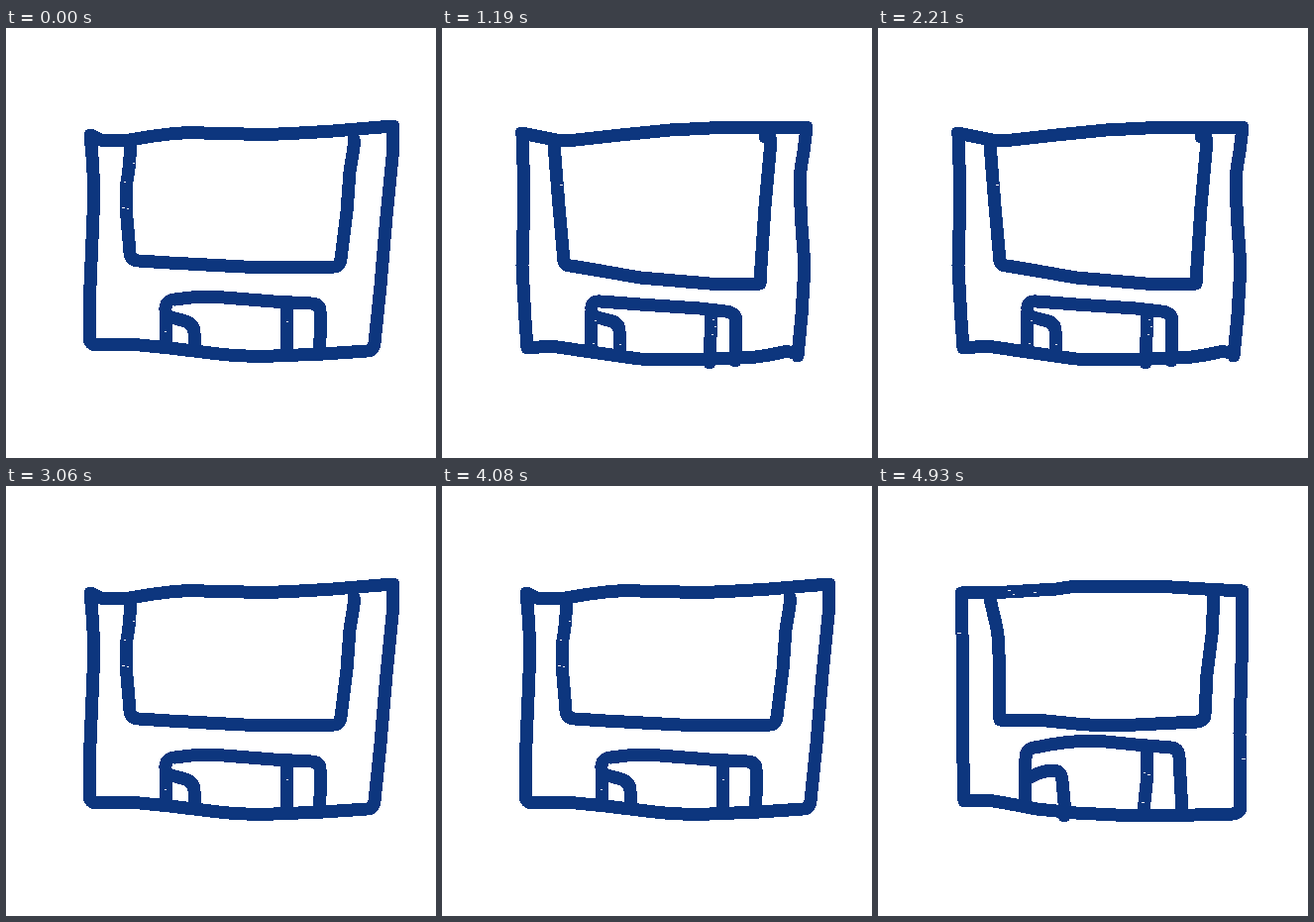
Recreate the animation shown at these times as an HTML page. Size 434 px wide and 434 px high, loop 5.1 s.

```html
<!DOCTYPE html>
<html lang="en">
<head>
<meta charset="utf-8">
<title>Wobbling sketch</title>
<style>
  html, body { margin: 0; width: 100%; height: 100%; overflow: hidden; background: #fff; }
  svg { display: block; width: 100%; height: 100%; shape-rendering: crispEdges; }
  path { fill: none; stroke: #0d367e; stroke-width: 13; stroke-linecap: round; stroke-linejoin: round; }
  .flat { stroke-linecap: butt; }
  .specks { stroke: #fff; stroke-width: 1; stroke-linecap: butt; }
  .pose { opacity: 0; }
</style>
</head>
<body>
<svg viewBox="0 0 434 434">
  <!-- each pose: case, screen, base, small arch, divider, pen gaps -->
  <g class="pose">
    <path d="M86 108L95 113Q110 115 125 113Q145 109 165 107T200 106L240 107L275 107Q300 106 330 104L366 101L391 99L390 130L384 190L378 260L372 318Q371 326 364 326L320 329L270 331Q240 332 215 329L165 323L125 319L92 320Q84 320 84 312L85 260L88 190Q89 150 87 130L85 108"/>
    <path d="M125 116L125 130Q124 145 122 155L121 180L124 215L125 227Q126 235 134 235L165 237L240 241L300 242L331 241Q337 241 338 233L344 185L347 145L351 120L351 112"/>
    <path class="flat" d="M161 324L161 285Q160 276 170 274Q195 270 220 272L270 276L308 278Q317 278 317 286L318 300L316 327"/>
    <path class="flat" d="M163 291L178 295Q190 298 190 308L191 325"/>
    <path class="flat" d="M283 276L284 328"/>
    <path class="specks" d="M128 136h2M119 155h2M117 181h3M122 182h2M168 280h2M160 306h2M283 296h2"/>
  </g>
  <g class="pose">
    <path d="M80 106L110 112Q122 115 135 113L180 108L230 103L290 100L340 100L368 100L365 125Q361 145 361 160L363 200L366 240L363 290L359 331L358 329Q350 325 340 328Q318 333 300 333L250 335L200 334L150 327L110 321L86 323L84 295L81 240L83 170L81 106"/>
    <path d="M113 117L118 180L123 235Q124 240 130 240L160 245L200 252L270 258L321 258L322 240L326 180L331 125L331 110L326 110"/>
    <path class="flat" d="M150 324L151 285Q150 275 160 276L200 279L260 283L286 286Q297 287 297 296L296 330"/>
    <path d="M296 325L296 336"/>
    <path class="flat" d="M153 291L168 295Q179 297 179 306L180 328"/>
    <path d="M272 287L270 338"/>
    <path class="specks" d="M119 158h3M154 295h2M152 318h2M179 319h2M273 294h2M275 301h2M272 309h2"/>
  </g>
  <g class="pose">
    <path d="M84 108L130 107L180 104Q195 101 210 101L280 101L330 104L368 106L367 180L365 250L366 323Q366 330 358 331L320 332L260 333L200 330L160 326Q130 320 110 317L87 318L85 240L85 150L84 108"/>
    <path d="M113 114L118 135Q122 150 122 170L123 236L160 236L200 240Q230 243 260 241L322 238Q330 237 330 230L332 190L337 150L339 110"/>
    <path class="flat" d="M148 323L149 275Q149 265 158 264Q190 257 220 257L260 261L296 264Q304 265 304 274L307 329"/>
    <path class="flat" d="M152 295Q165 287 177 287Q185 287 186 298L189 330"/>
    <path d="M188 326L188 333"/>
    <path class="flat" d="M271 264L271 300L267 338"/>
    <path class="specks" d="M131 105h3M136 109h2M157 107h3M80 148h4M367 275h4M268 289h2M272 291h3M266 319h3"/>
  </g>
</svg>
<script>
  const STEP = 170;
  const poses = document.querySelectorAll('.pose');
  const frames = [
    { opacity: 1, offset: 0, easing: 'step-end' },
    { opacity: 0, offset: 1 / poses.length, easing: 'step-end' },
    { opacity: 0, offset: 1 }
  ];
  poses.forEach((pose, i) => pose.animate(frames, {
    duration: STEP * poses.length,
    delay: STEP * (i - poses.length),
    iterations: Infinity
  }));
</script>
</body>
</html>
```
